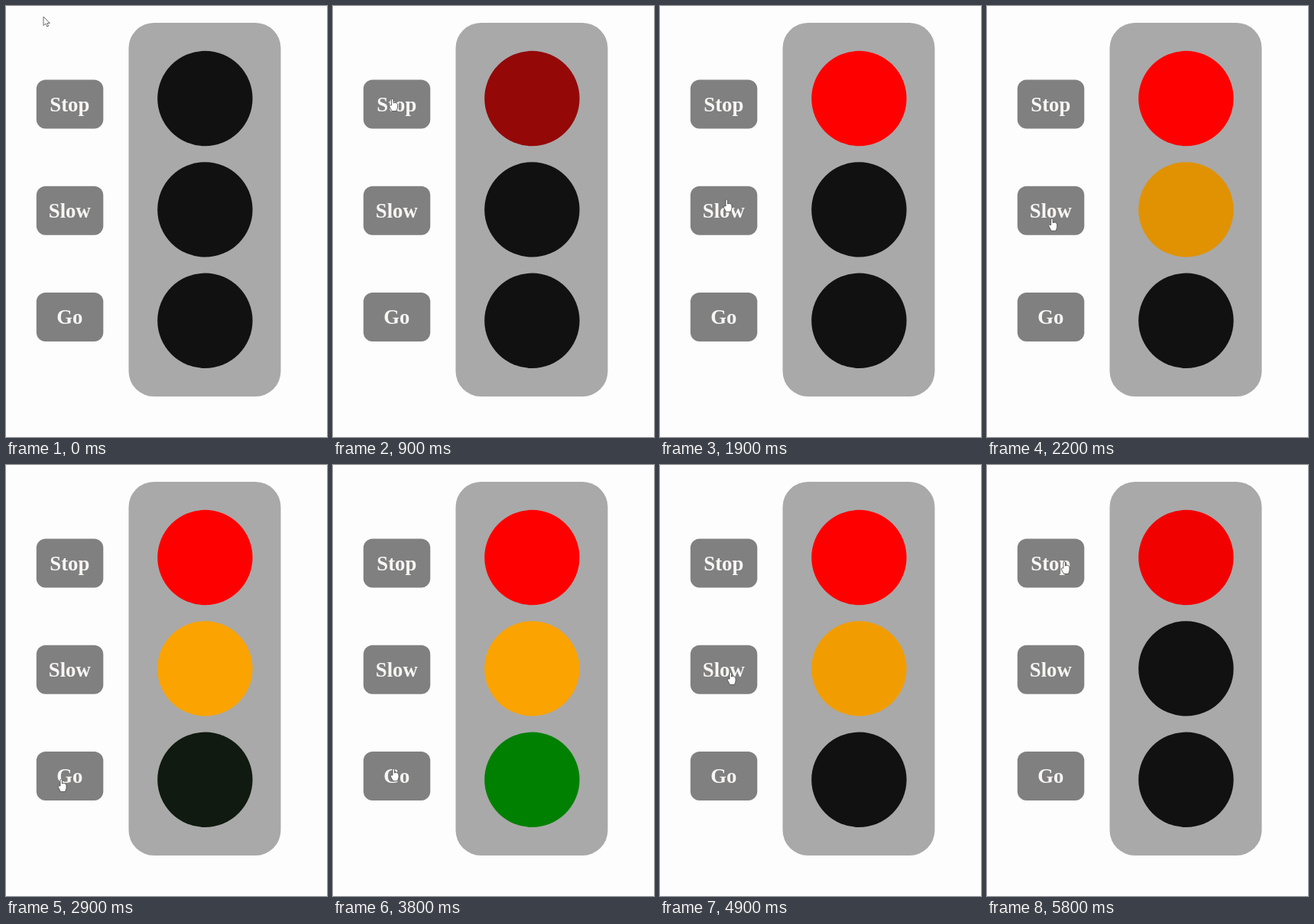
An HTML page for the animation above (5900 ms loop, 420x564 px).

```html
<!DOCTYPE html>
<html lang="en">
<meta charset="utf-8">
<title>Traffic light</title>
<style>
  html, body { margin: 0; width: 100%; height: 100%; overflow: hidden; background: #fdfdfd; }
  svg { display: block; width: 420px; height: 564px; }
  text { font: bold 26.7px "Liberation Serif", Times, serif; fill: #f8f6f4; text-anchor: middle; }
</style>
<svg viewBox="0 0 420 564">
  <rect x="160.5" y="22" width="199" height="489" rx="33" fill="#a9a9a9"/>
  <g id="parts"></g>
  <g id="cursor" fill="#fff" stroke="#444" stroke-width=".8" stroke-linejoin="round">
    <path id="arrow" d="M0 0V11.5L2.8 9L4.8 13L6.6 12.2L4.8 8.4H8.3Z"/>
    <path id="hand" d="M-1.5 9V1Q0-.6 1 1V6Q5 4 6.5 8V12L5 16.5H-1L-4.5 10Q-4 8-1.5 9Z"/>
  </g>
</svg>
<script>
const LOOP = 5900, STEP = 100, FADE = 500, LEG = 1000;
const DARK = 17, SIZE = { width: 87.5, height: 64 };
const $ = id => document.getElementById(id);

const lights = [
  { label: 'Stop', color: [255, 0, 0], on: 740, off: 5765 },
  { label: 'Slow', color: [251, 163, 0], on: 1900, off: 4870 },
  { label: 'Go', color: [0, 128, 0], on: 2855, off: 4100 }
];

// The pointer reaches one stop per leg; a swing bows the way there
const stops = [
  { x: 49, y: 14 },
  { x: 78, y: 121, swing: [160, 330] },
  { x: 87.5, y: 253, swing: [0, 200] },
  { x: 72.5, y: 411 },
  { x: 79.5, y: 397 },
  { x: 92.5, y: 271 },
  { x: 101.5, y: 126 }
];

function add(tag, attrs, text = '') {
  const el = document.createElementNS('http://www.w3.org/2000/svg', tag);
  for (const k in attrs) el.setAttribute(k, attrs[k]);
  el.textContent = text;
  return $('parts').appendChild(el);
}

lights.forEach((l, i) => {
  l.top = 96.4 + 139.3 * i;
  l.lamp = add('circle', { cx: 260.4, cy: 121 + 145.4 * i, r: 62.2 });
  add('rect', { x: 39.8, y: l.top, ...SIZE, rx: 12, fill: '#808080' });
  add('text', { x: 83.3, y: l.top + 41.3 }, l.label);
});

const clamp = x => Math.min(1, Math.max(0, x));
const smooth = x => x * x * (3 - 2 * x);

// CSS "ease" curve: cubic-bezier(.25, .1, .25, 1)
function ease(x) {
  const bez = (a, b, s) => 3 * a * s * (1 - s) ** 2 + 3 * b * s * s * (1 - s) + s ** 3;
  let lo = 0, hi = 1;
  for (let i = 0; i < 20; i++) {
    const mid = (lo + hi) / 2;
    if (bez(.25, .25, mid) < x) lo = mid; else hi = mid;
  }
  return bez(.1, 1, lo);
}

function pointer(t) {
  const pos = (t + STEP) / LEG, i = Math.floor(pos);
  const a = stops[i], b = stops[i + 1] || a;
  const k = smooth(clamp((pos - i - .1) / .8));
  const bow = Math.sin(Math.PI * k), [dx, dy] = b.swing || [0, 0];
  return [a.x + (b.x - a.x) * k + dx * bow, a.y + (b.y - a.y) * k + dy * bow];
}

function draw(t) {
  const fade = from => ease(clamp((t - from) / FADE));
  for (const l of lights) {
    const level = fade(l.on) - fade(l.off);
    const mix = l.color.map(c => Math.round(DARK + (c - DARK) * level));
    l.lamp.setAttribute('fill', `rgb(${mix})`);
  }
  const [x, y] = pointer(t);
  const over = x > 40 && x < 127 && lights.some(l => y > l.top && y < l.top + SIZE.height);
  $('cursor').setAttribute('transform', `translate(${x} ${y})`);
  $('hand').style.display = over ? '' : 'none';
  $('arrow').style.display = over ? 'none' : '';
}

const start = performance.now();
function tick() {
  const t = (performance.now() - start) % LOOP;
  draw(Math.floor(t / STEP) * STEP);
  requestAnimationFrame(tick);
}
tick();
</script>
</html>
```
